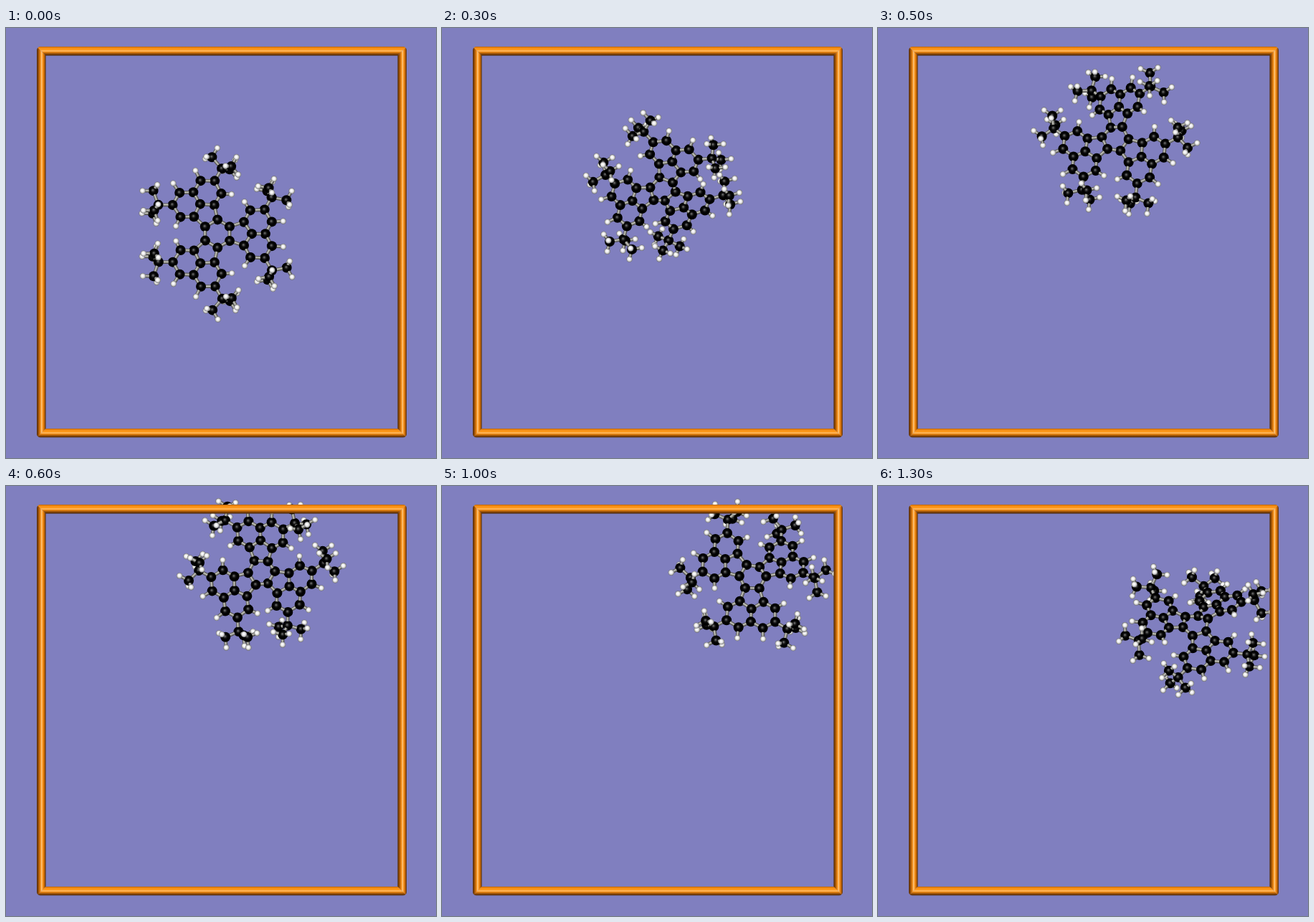
An HTML page with a canvas that plays this animation: 600 px wide and 600 px high, repeating every 1400 ms.

```html
<!DOCTYPE html>
<html>
<head>
<meta charset="utf-8">
<title>Molecule in a box</title>
<style>
html, body { margin: 0; height: 100%; overflow: hidden; background: #807fbf; }
canvas { display: block; width: 100vw; height: 100vh; }
</style>
</head>
<body>
<canvas id="c" width="600" height="600"></canvas>
<script>
const ctx = document.getElementById('c').getContext('2d');
const STEP = 100, LOOP = 1400, TURN = Math.PI * 2;

// Key poses: time, centre, spin in degrees, sideways lean of the normal
const poses = [
  [0, 295, 287, 0, .06, -.12],
  [300, 308, 226, 43, .3, .48],
  [500, 331, 154, 36, -.06, -.25],
  [600, 356.5, 120.5, 27, .24, .19],
  [800, 425, 115, 81, .17, -.2],
  [1100, 434, 139, 92, .1, -.17],
  [1300, 443, 193, 72, .09, -.55]
];

// Three identical arms around the central ring, 20 px per ring bond
const atoms = [];
const turn = (x, y, a) => [x * Math.cos(a) - y * Math.sin(a), x * Math.sin(a) + y * Math.cos(a)];
for (let arm = 0; arm < 3; arm++) {
  const add = (x, y, z, h) => atoms.push({ arm, x, y, z, h, rest: [...turn(x, y, arm * TURN / 3), z] });
  add(48, 0, 0);
  add(67, 0, 0);
  for (const s of [-1, 1]) {
    for (const [x, y] of [[17, 10], [37, 16.5], [46, 33], [66, 34], [76, 17]]) add(x, y * s, 0);
    add(38, 45 * s, 0, true);
    add(92, 18 * s, 0, true);
    // tert-butyl group with staggered methyls
    const d = [.5, .866 * s, 0];
    const leg = (p, z) => [d[0] / 3 + .866 * p, d[1] / 3 - .5 * s * p, z];
    const legs = [leg(.943, 0), leg(-.471, .816), leg(-.471, -.816)];
    const q = [66 + 20 * d[0], (34 + 20 * .866) * s, 0];
    add(...q);
    for (const m of legs) {
      const c = q.map((v, i) => v + 21 * m[i]);
      add(...c);
      const ends = [d, ...legs.filter(o => o !== m).map(o => o.map(v => -v))];
      for (const e of ends) add(...c.map((v, i) => v + 15 * e[i]), true);
    }
  }
}

const gap = (p, q) => Math.hypot(...p.map((v, i) => v - q[i]));
const bonds = [];
atoms.forEach((a, i) => atoms.slice(0, i).forEach(b => {
  if (!(a.h && b.h) && gap(a.rest, b.rest) < (a.h || b.h ? 18 : 24)) bonds.push([a, b]);
}));

function slope(i, n) {
  const p = poses[Math.max(i - 1, 0)], q = poses[Math.min(i + 1, poses.length - 1)];
  return (q[n] - p[n]) / (q[0] - p[0]);
}

// Smooth curve through the key poses
function poseAt(t) {
  let i = 0;
  while (i < poses.length - 2 && t >= poses[i + 1][0]) i++;
  const p = poses[i], q = poses[i + 1], dt = q[0] - p[0], k = (t - p[0]) / dt, j = 1 - k;
  return p.map((v, n) => v * j * j * (1 + 2 * k) + q[n] * k * k * (3 - 2 * k)
    + dt * k * j * (slope(i, n) * j - slope(i + 1, n) * k));
}

function place(t) {
  const [, cx, cy, spin, nx, ny] = poseAt(t);
  const nz = Math.sqrt(1 - nx * nx - ny * ny);
  const relax = Math.min(1, t / 300), size = 1 - .05 * relax;
  for (const o of atoms) {
    // the arms twist about their own axes as the molecule leaves its flat start
    const [y0, z] = turn(o.y, o.z, relax * (o.arm === 2 ? .57 : -.15));
    const [x, y] = turn(o.x * size, y0, o.arm * TURN / 3 + spin * TURN / 360);
    const dot = x * nx + y * ny, lift = z - dot / (1 + nz);
    o.p = [cx + x + nx * lift, cy + y + ny * lift, z * nz - dot];
  }
}

function paint(gradient, stops) {
  stops.forEach(([at, colour]) => gradient.addColorStop(at, colour));
  ctx.fillStyle = gradient;
}

const carbon = [[0, '#808080'], [.16, '#484848'], [.36, '#121212'], [.6, '#000'], [1, '#000']];
const hydrogen = [[0, '#fff'], [.4, '#f4f4f4'], [.72, '#c6c6c6'], [1, '#6c6c6c']];
const radius = o => o.h ? 4.2 : 7;

function ball(o) {
  const [x, y] = o.p, r = radius(o);
  paint(ctx.createRadialGradient(x - r * .12, y - r * .16, 0, x, y, r), o.h ? hydrogen : carbon);
  ctx.beginPath();
  ctx.arc(x, y, r, 0, TURN);
  ctx.fill();
}

// The part of a bond that lies outside its two balls
function ends([a, b]) {
  const len = gap(a.p, b.p);
  const from = (o, e) => o.p.map((v, i) => v + (e.p[i] - v) * .85 * radius(o) / len);
  return [from(a, b), from(b, a)];
}

function stick([a, b]) {
  for (const [width, colour, off] of [[4.8, '#4c4c47', 0], [3.2, '#898983', -.2], [1.3, '#c4c4bc', -.4]]) {
    ctx.lineWidth = width;
    ctx.strokeStyle = colour;
    ctx.beginPath();
    ctx.moveTo(a[0] + off, a[1] + off);
    ctx.lineTo(b[0] + off, b[1] + off);
    ctx.stroke();
  }
}

const L = 43, T = 26, R = 559, B = 571.5, W = 12.5;
const flat = [[0, '#b46008'], [.14, '#f68c10'], [.36, '#ff9a1c'], [.48, '#ffc070'], [.6, '#ee8a14'], [.78, '#9c5206'], [1, '#402000']];
const upright = [[0, '#4e2800'], [.2, '#a05204'], [.4, '#ee8812'], [.54, '#ffc880'], [.68, '#f89016'], [.86, '#b86004'], [1, '#4e2800']];

function bar(corners, line, stops) {
  paint(ctx.createLinearGradient(...line), stops);
  ctx.beginPath();
  corners.forEach(c => ctx.lineTo(...c));
  ctx.fill();
}

function box() {
  const l = L + W, t = T + W, r = R - W, b = B - W;
  ctx.save();
  ctx.beginPath();
  ctx.roundRect(L, T, R - L, B - T, 5);
  ctx.clip();
  bar([[L, T], [l, t], [l, b], [L, B]], [L, 0, l, 0], upright);
  bar([[R, T], [r, t], [r, b], [R, B]], [r, 0, R, 0], upright);
  bar([[L, T], [R, T], [r, t], [l, t]], [0, T, 0, t], flat);
  bar([[L, B], [R, B], [r, b], [l, b]], [0, b, 0, B], flat);
  ctx.restore();
}

function draw(now) {
  place(Math.floor(now % LOOP / STEP) * STEP);
  ctx.fillStyle = '#807fbf';
  ctx.fillRect(0, 0, 600, 600);
  const parts = atoms.map(o => ({ z: o.p[2], show: () => ball(o) }));
  for (const pair of bonds) {
    const [a, b] = ends(pair);
    parts.push({ z: (a[2] + b[2]) / 2 - .5, show: () => stick([a, b]) });
  }
  parts.sort((m, n) => m.z - n.z).forEach(o => o.show());
  box();
}

const start = performance.now();
function tick() {
  draw(performance.now() - start);
  requestAnimationFrame(tick);
}
tick();
</script>
</body>
</html>
```
